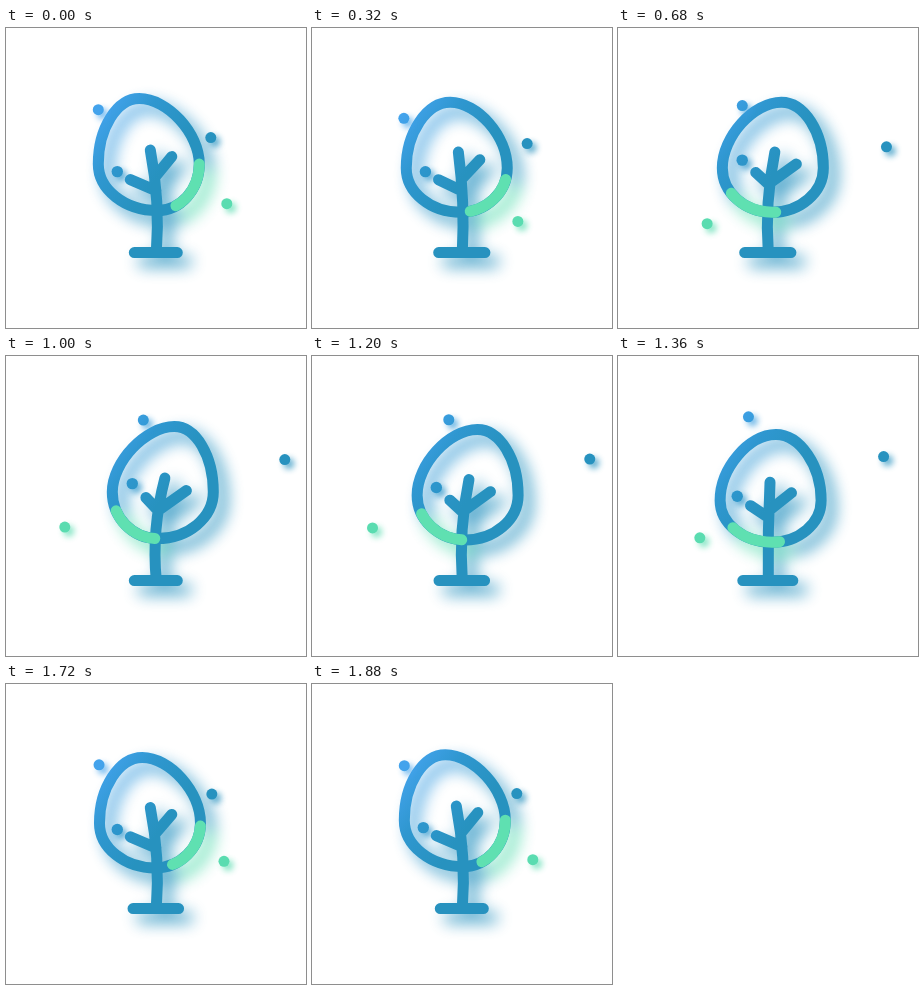
Animation, 300 px wide and 300 px high, one loop 1.92 s. Source, as an HTML page:

```html
<!DOCTYPE html>
<html lang="en">
<head>
<meta charset="utf-8">
<title>Swaying tree</title>
<style>
html, body { margin: 0; width: 100%; height: 100%; overflow: hidden; background: #fff; }
svg { display: block; width: 100%; height: 100%; }
.line { fill: none; stroke: url(#blue); stroke-width: 11; stroke-linecap: round; stroke-linejoin: round; }
#leaf { stroke: #5fe0b1; stroke-dasharray: 50 2000; }
circle { fill: url(#blue); }
#seed { fill: #5adcb0; }
</style>
</head>
<body>
<svg viewBox="0 0 300 300">
  <defs>
    <linearGradient id="blue" gradientUnits="userSpaceOnUse" x1="100" y1="75" x2="170" y2="125">
      <stop offset="0" stop-color="#43a3ec"/>
      <stop offset=".45" stop-color="#2f97d0"/>
      <stop offset="1" stop-color="#2792bf"/>
    </linearGradient>
    <filter id="soft" filterUnits="userSpaceOnUse" x="0" y="0" width="301" height="301" color-interpolation-filters="sRGB">
      <feGaussianBlur in="SourceGraphic" stdDeviation="8"/>
      <feOffset dx="9" dy="9"/>
      <feComponentTransfer result="shade"><feFuncA type="linear" slope=".8"/></feComponentTransfer>
      <feMerge><feMergeNode in="shade"/><feMergeNode in="SourceGraphic"/></feMerge>
    </filter>
    <filter id="tight" filterUnits="userSpaceOnUse" x="0" y="0" width="301" height="301" color-interpolation-filters="sRGB">
      <feGaussianBlur in="SourceGraphic" stdDeviation="3"/>
      <feOffset dx="4" dy="4"/>
      <feComponentTransfer result="shade"><feFuncA type="linear" slope=".75"/></feComponentTransfer>
      <feMerge><feMergeNode in="shade"/><feMergeNode in="SourceGraphic"/></feMerge>
    </filter>
  </defs>
  <g transform="translate(-.7 -.4)">
    <g filter="url(#soft)">
      <path class="line" id="trunk"/>
      <path class="line" id="crown"/>
      <path class="line" id="leaf"/>
    </g>
    <g filter="url(#tight)">
      <circle id="upper" r="5.5"/>
      <circle id="side" r="5.5"/>
      <circle id="inner" r="5.7"/>
      <circle id="seed" r="5.5"/>
    </g>
  </g>
</svg>
<script>
const LOOP = 1920, STEP = 40;
const LEFT = -20, TURN = 1020, HOME = 1900;
const GROUND = 225;

// Drifting dots: centre, reach of the swing, and bow of the path each way
const drifters = {
  upper: { mid: [115.5, 73.3], reach: [22.5, -8.8], out: [-14, 23], back: [2, -11], twist: 0 },
  side:  { mid: [242.5, 107], reach: [37, -3], out: [0, 22], back: [0, 0], twist: 11 },
  seed:  { mid: [140.5, 173.8], reach: [-81, -2.3], out: [16, 44], back: [-10, 22], twist: 8 }
};

const el = id => document.getElementById(id);
const set = (id, attrs) => {
  for (const name in attrs) el(id).setAttribute(name, attrs[name]);
};

const ease = (u, n) => u < 0.5 ? (2 * u) ** n / 2 : 1 - (2 - 2 * u) ** n / 2;

// -1 is full left, 1 full right; the way back has its own power and end
function swing(t, power, end = HOME) {
  if (t < TURN) return 2 * ease((t - LEFT) / (TURN - LEFT), 3) - 1;
  return 1 - 2 * ease(Math.min(1, (t - TURN) / (end - TURN)), power);
}

// Egg through its four extreme points, starting at the right
function crownPath(lean, squash) {
  const top = 151.5 + 17.5 * lean, topY = 71 + 9.5 * squash;
  const left = 100 + 7 * lean, right = 201 + 7 * lean, waist = 136.5 + 10 * squash;
  const base = 152 + 8 * lean * (1 - lean * lean), baseY = 183 + 4.3 * squash;
  const bend = width => 0.71 - width * 0.004;
  const kr = bend(right - top), kl = bend(top - left), k = 0.55;
  const up = waist - topY, low = waist + k * (baseY - waist);
  return `M${right} ${waist}
    C${right} ${low} ${base + k * (right - base)} ${baseY} ${base} ${baseY}
    C${base - k * (base - left)} ${baseY} ${left} ${low} ${left} ${waist}
    C${left} ${waist - kl * up} ${top - kl * (top - left)} ${topY} ${top} ${topY}
    C${top + kr * (right - top)} ${topY} ${right} ${waist - kr * up} ${right} ${waist}Z`;
}

function trunkPath(bend, squash) {
  const root = 151, tip = 152.3 + 7.3 * bend, tipY = 122.5 + 5 * squash;
  const belly = root + (151.5 - tip) * 0.6;
  const trunkX = y => {
    const u = (GROUND - y) / (GROUND - tipY), w = 1 - u;
    return w * w * root + 2 * u * w * belly + u * u * tip;
  };
  const branch = (x, y, fork) => `M${x} ${y}L${trunkX(fork)} ${fork}`;
  const foot = 21.5 + 4.2 * squash;
  return `M${root} ${GROUND}Q${belly} ${(GROUND + tipY) / 2} ${tip} ${tipY}`
    + branch(132.8 + 7.8 * bend, 147 - 5 * bend + 4 * squash, 159 - 4 * bend + 4 * squash)
    + branch(173.8 + 7.3 * bend, 132 + 3 * bend + 6 * squash, 152.5 + 2.5 * bend + 3 * squash)
    + `M${150.5 - foot} ${GROUND}h${2 * foot}`;
}

function driftTo(dot, drift, outward) {
  const open = 1 - drift * drift;
  const bow = outward ? dot.out : dot.back;
  const [x, y] = dot.mid.map((m, i) => m + dot.reach[i] * drift + bow[i] * open);
  return { cx: x, cy: y + dot.twist * drift * open * (outward ? 1 : -1) };
}

function draw(t) {
  const outward = t < TURN;
  const lean = swing(t, 2), drift = swing(t, 4), bend = swing(t, 2, 1720);
  const squash = (1 - lean * lean) * (outward ? 0.8 : 1);
  const egg = crownPath(lean, squash);
  set('crown', { d: egg });
  set('leaf', { d: egg, 'stroke-dashoffset': -41.5 * (1 + swing(t, 3)) });
  set('trunk', { d: trunkPath(bend, squash) });
  set('inner', { cx: 119.5 + 7.5 * bend, cy: 136 - 8 * bend + 6 * squash });
  for (const id in drifters) set(id, driftTo(drifters[id], drift, outward));
}

const start = performance.now();
function tick() {
  const t = (performance.now() - start) % LOOP;
  draw(Math.floor(t / STEP) * STEP);
  requestAnimationFrame(tick);
}
tick();
</script>
</body>
</html>
```
